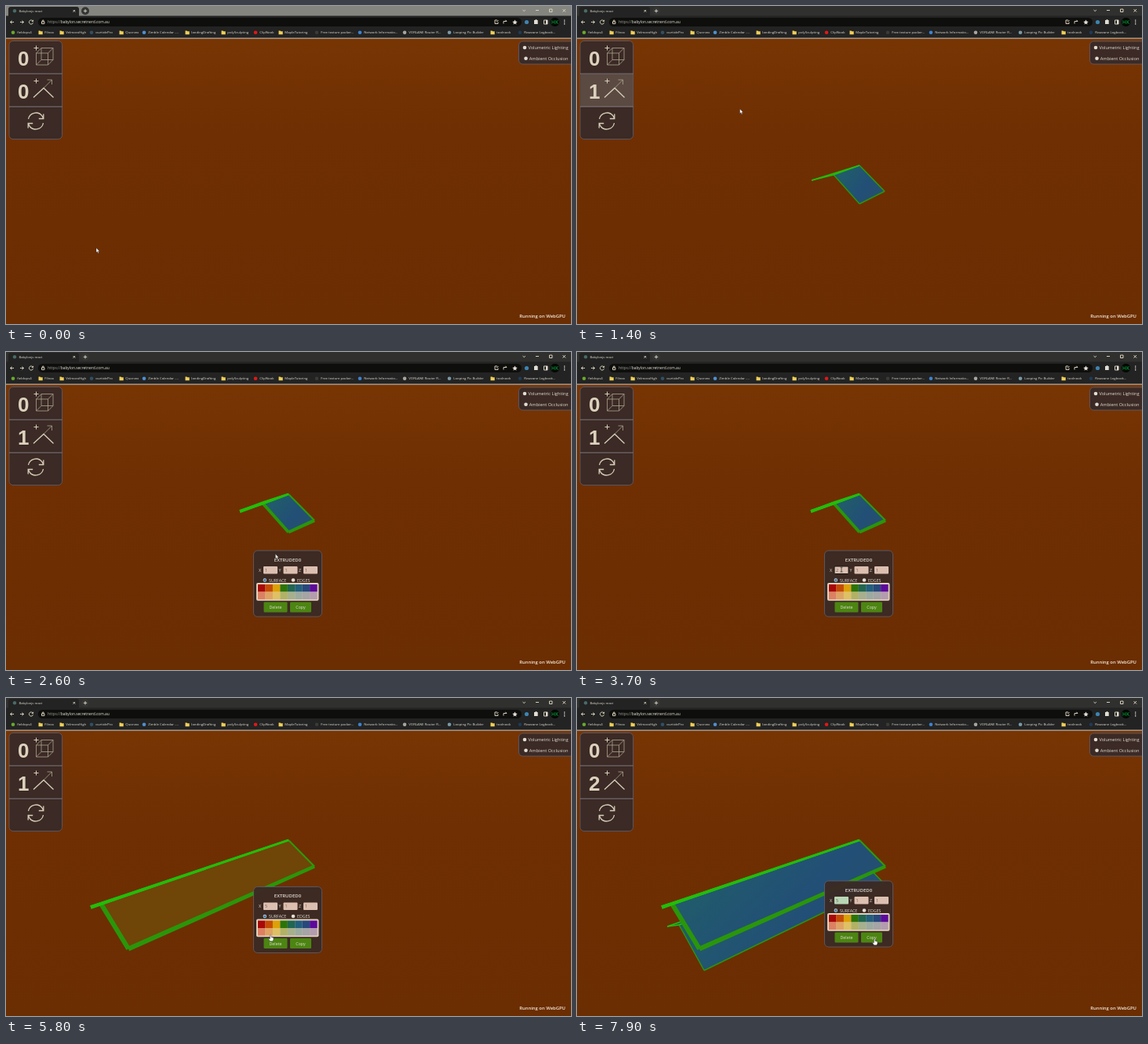
These frames come from a looping animation (720 by 405 pixels, 8000 ms). An HTML page:

```html
<!DOCTYPE html>
<html lang="en">
<head>
<meta charset="utf-8">
<title>Roof editor</title>
<style>
html, body { margin: 0; width: 100%; height: 100%; overflow: hidden; background: #6d2e02; }
svg { display: block; width: 720px; height: 405px; font-family: "Open Sans", "Noto Sans", sans-serif; }
.ui { fill: #e2ddd4; }
.line { fill: none; stroke: #d6cdb8; stroke-width: 1; }
.thin { stroke: #aca48f; stroke-width: .8; }
.box { fill: #3b2a25; stroke: #5d6070; stroke-width: .8; }
.count { font: bold 26px "Liberation Sans", Arial, sans-serif; fill: #dcd2bd; }
.small { font-size: 5.3px; fill: #e2ddd4; }
</style>
</head>
<body>
<svg viewBox="0 0 720 405">
  <defs>
    <linearGradient id="sky" x2="0" y2="1">
      <stop offset=".1" stop-color="#783504"/><stop offset=".4" stop-color="#6f2f02"/><stop offset="1" stop-color="#6b2d02"/>
    </linearGradient>
    <linearGradient id="blue" x2="1" y2=".5">
      <stop stop-color="#22606a"/><stop offset=".3" stop-color="#215a6c"/><stop offset=".7" stop-color="#224f76"/><stop offset="1" stop-color="#264f70"/>
    </linearGradient>
  </defs>
  <rect width="720" height="405" fill="url(#sky)"/>

  <!-- browser bars -->
  <rect id="tabs" width="720" height="13"/>
  <rect y="12.5" width="720" height="28.5" fill="#222322"/>
  <path d="M3 13V4q0-3 3-3H90q3 0 3 3V13z" fill="#222322"/>
  <rect x="41" y="15" width="616" height="11" rx="5.5" fill="#0e0e0c"/>
  <path d="M0 41.2H720" stroke="#b3aca4" stroke-width="1.2"/>
  <circle cx="11" cy="6.3" r="2.2" fill="#4a6a68"/>
  <text x="16.5" y="8" class="ui" font-size="4.2">Babylonjs react</text>
  <circle cx="101" cy="6.3" r="5" fill="#343534"/>
  <path class="line" d="M85.5 5l2.6 2.6m0-2.6l-2.6 2.6M98.8 6.3h4.4m-2.2-2.2v4.4M10 20.5H5.5l2-2m-2 2l2 2M18 20.5h4.5l-2-2m2 2l-2 2M34.3 19.3a2.6 2.6 0 1 0 .2 2M34.6 17.8v1.8h-1.8M45.5 20h3.4v2.6h-3.4zM46.2 20v-1a1 1 0 0 1 2 0v1M658.5 5l1.7 1.6 1.7-1.6M675 5.5h4M692.5 4h3.5v3.5h-3.5zM709.5 4l3.5 3.5m0-3.5l-3.5 3.5M626 18h-3v4.5h4v-2M625 20.5l2.5-2.5M634 22.5v-3h4l-1.5-1.7M685.5 18h4.5v5h-4.5z"/>
  <path class="ui" d="M648.5 17.5l1 2.1 2.2.3-1.7 1.5.5 2.2-2-1.1-2 1.1.5-2.2-1.7-1.5 2.2-.3zM673 18h1.500a1 1 0 0 1 2 0h1.200v5h-4.700zM688 18h2v5h-2zM711 17.500h1.300v1.300h-1.300zm0 2.300h1.300v1.300h-1.300zm0 2.300h1.300v1.300h-1.300z"/>
  <circle cx="663.5" cy="20.5" r="2.6" fill="#3d83b0"/>
  <rect x="694" y="15" width="11" height="11" rx="5" fill="#020802"/>
  <text x="699.5" y="23" font-size="6.5" text-anchor="middle" fill="#10c04b">HK</text>
  <text x="53" y="22.3" font-size="4.9" fill="#a5a5a0">https://<tspan fill="#eeeae2">babylon.secretnerd.com.au</tspan></text>
  <g id="marks" class="ui" font-size="4.3"></g>

  <!-- left tools -->
  <rect class="box" x="4" y="44.5" width="67.5" height="125" rx="5"/>
  <rect id="hover" x="4.5" y="87" width="66.5" height="41" fill="#5b4a42"/>
  <path d="M4 86.2h67.5M4 128.2h67.5" stroke="#8f8a92" stroke-width=".8"/>
  <text class="count" x="15" y="76">0</text>
  <text class="count" x="15" y="118" id="count">0</text>
  <path class="line" d="M35.5 53.5h6m-3-3v6M35.5 95.5h6m-3-3v6"/>
  <path class="line thin" d="M38.5 60h15v15h-15zM45 53.5h15v15h-15zM38.5 60l6.5-6.5M53.5 60l6.5-6.5M53.5 75l6.5-6.5M38.5 75l6.5-6.5M48 104.5l10.5-10.5m-6 0h6v6"/>
  <path class="line" style="stroke-width:1.3" d="M35 116.5l13-12 12.5 12M28.5 144a9.8 9.8 0 0 1 17.5-4l1.5 3M47.5 149a9.8 9.8 0 0 1-17.5 4l-1.5-3M47.8 137.5v6h-6M28.2 155.5v-6h6"/>

  <!-- right options -->
  <rect class="box" x="653.5" y="45" width="72" height="29" rx="5"/>
  <g class="ui">
    <circle cx="661" cy="53" r="2.3"/><circle cx="662.5" cy="66.8" r="2.3"/>
    <g text-anchor="end" font-size="5.7">
      <text x="716.5" y="55.2">Volumetric Lighting</text>
      <text x="716.5" y="68.8">Ambient Occlusion</text>
      <text x="713" y="397" font-weight="600" font-size="5.9" fill="#f4ecdc">Running on WebGPU</text>
    </g>
  </g>

  <g id="scene"></g>

  <g id="panel">
    <rect class="box" x=".5" y=".5" width="87" height="84" rx="5" fill-opacity=".96"/>
    <text x="44" y="14.3" text-anchor="middle" class="ui" font-size="6" font-weight="600">EXTRUDED0</text>
    <g id="fields"></g>
    <circle cx="14.8" cy="38" r="2.2" class="ui"/><circle cx="14.8" cy="38" r="1.5" fill="#2877b8"/>
    <circle cx="51" cy="38" r="2.3" class="ui"/>
    <text x="20" y="40.2" class="small">SURFACE</text><text x="56" y="40.2" class="small">EDGES</text>
    <rect x="4" y="41.5" width="79.5" height="22.8" rx="2" fill="#e2d0ba"/>
    <g id="swatches"></g>
    <rect x="13.5" y="66" width="30" height="13" rx="1" fill="#4c8512"/>
    <rect x="47" y="66" width="27" height="13" rx="1" fill="#4c8512"/>
    <g class="small" text-anchor="middle"><text x="28.5" y="74.5">Delete</text><text x="60.5" y="74.5">Copy</text></g>
  </g>

  <g id="cursor" stroke="#222" stroke-width=".4" fill="#fff">
    <path id="arrow" d="M0 0v6l1.4-1.2 1 2.2 1-.5-1-2.1h1.9z"/>
    <path id="beam" d="M-1.5-3h3M0-3v6M-1.5 3h3" stroke="#333" stroke-width=".8"/>
    <path id="hand" d="M-.6-3q.9-1 1.5 0v2.5l3 .7v2.5l-1 2h-3.4l-2-3q0-1 1.9 0z"/>
  </g>
</svg>
<script>
const LOOP = 8000;
const $ = id => document.getElementById(id);
const clamp = v => Math.max(0, Math.min(1, v));
const ramp = (t, a, b) => clamp((t - a) / (b - a));
const ease = u => u * u * (3 - 2 * u);
const mix = (a, b, u) => a + (b - a) * u;
const mixPts = (p, q, u) => p.map((v, i) => [mix(v[0], q[i][0], u), mix(v[1], q[i][1], u)]);

// bookmarks: icon x, label, icon colour (folder when omitted)
const bookmarks = [
  [9, 'fieldops4', '#6aa82c'], [44, 'Filnox'], [71, 'VelmoraHigh'], [109, 'ourtidePro', '#334f63'],
  [147, 'Quorvex'], [176, 'Zimble Calendar -...', '#4f8fd0'], [231, 'landingDrafting'], [277, 'polySculpting'],
  [318, 'ClipNook', '#e01818'], [350, 'MapleTutoring'], [396, 'Free texture packer...', '#3c3a34'],
  [451, 'Network Informatio...', '#3d83d0'], [508, 'VORLANE Router R...', '#aaa59c'],
  [565, 'Looping Pic Builder', '#7a9aa8'], [620, 'toolnook'], [655, 'Rowvane Logbook...', '#1f3a58']
];
$('marks').innerHTML = bookmarks.map(([x, label, color]) =>
  (color ? `<circle cx="${x}" cy="33.8" r="2.3" fill="${color}"/>`
         : `<path d="M${x - 2.5} 31.5h2l.7.8h2.5v4h-5.2z" fill="#f0cf58"/>`) +
  `<text x="${x + 5.3}" y="35.4">${label}</text>`).join('');

const swatches = ['#a80808', '#c44b04', '#dda008', '#2d7408', '#216650', '#235f7c', '#27487c', '#5b0a9a',
                  '#dd8062', '#dfa262', '#dfc064', '#b1b264', '#a6b08c', '#9caaa0', '#a5a4a6', '#b39cae'];
$('swatches').innerHTML = swatches.map((c, i) =>
  `<rect x="${6 + i % 8 * 9.45}" y="${i < 8 ? 43.5 : 53}" width="9.5" height="9.5" fill="${c}"/>`).join('');

$('fields').innerHTML = ['X', 'Y', 'Z'].map((name, i) => {
  const x = 7 + i * 25.5;
  return `<text class="small" x="${x}" y="27.3">${name}</text>
    <rect id="in${name}" x="${x + 6}" y="20.5" width="18" height="9.5" rx="1" fill="#dcbfb0"/>
    <text id="val${name}" x="${x + 8}" y="27.3" font-size="5.3" fill="#6d5a50">1</text>`;
}).join('');

// roof corners: eave tip, front ridge, front foot, back foot, back ridge
const flat = [[299, 222], [327, 215], [360, 252], [392, 236], [360, 203]];
const short = [[298, 203], [327, 192.5], [360, 229.5], [393, 214.5], [360, 181]];
const long = [[108, 266.5], [121, 262], [156, 319.5], [393, 214.5], [360, 181]];
const copy = [[115, 291], [130, 289], [162, 347], [391, 236], [360, 204]];

const poly = (pts, fill) => `<polygon points="${pts}" fill="${fill}"/>`;

function bar(a, b, wa, wb, fill) {
  const dx = b[0] - a[0], dy = b[1] - a[1], d = 2 * Math.hypot(dx, dy);
  const nx = -dy / d, ny = dx / d;
  return poly([[a[0] + nx * wa, a[1] + ny * wa], [b[0] + nx * wb, b[1] + ny * wb],
               [b[0] - nx * wb, b[1] - ny * wb], [a[0] - nx * wa, a[1] - ny * wa]], fill);
}

function roof([tip, ridge, foot, back, top], thick, size, fill) {
  const w = v => mix(1.5, v, thick), near = w(4 + size * 2);
  return poly([tip, ridge, top], '#24605a') + poly([ridge, foot, back, top], fill) +
    bar(top, back, w(2), w(2), '#2c9c0a') +
    bar(foot, back, near, w(4.5), '#2a960a') +
    bar(ridge, foot, near, near, '#2a960a') +
    bar(tip, top, w(4), w(2.5), '#22bd0a') +
    bar(ridge, top, w(4), w(2.5), '#22bd0a') +
    bar(tip, ridge, near - thick, w(4), '#22bd0a');
}

const mouse = [[0, 115, 308], [300, 108, 290], [900, 48, 110], [1200, 48, 110], [1400, 207.5, 131], [2000, 355, 221],
  [2300, 355, 221], [2800, 337, 277], [4600, 337, 277], [5000, 337, 294], [5400, 337, 294],
  [5700, 337, 305], [6200, 337, 305], [7000, 379, 310], [8000, 379, 310]];

function mouseAt(t) {
  const i = mouse.findIndex(k => k[0] > t), a = mouse[i - 1], b = mouse[i];
  const u = ease(ramp(t, a[0], b[0]));
  return [mix(a[1], b[1], u), mix(a[2], b[2], u)];
}

function panelAt(t) {
  const [start, length, y] = t < 5500 ? [2000, 400, 252.5] : t < 6400 ? [5500, 300, 240] : [6400, 400, 232.5];
  const left = 1 - ease(ramp(t, start, start + length));
  return [315 - 200 * left, y + 105 * left];
}

const show = (id, on) => { $(id).style.display = on ? '' : 'none'; };
const move = (id, p) => $(id).setAttribute('transform', `translate(${p})`);

function draw(now) {
  const t = Math.floor(now % LOOP / 100) * 100;

  // each click on the spinner lengthens the roof by one unit
  let scale = 1;
  for (let k = 0; k < 4; k++) scale += ease(ramp(t, 3700 + 200 * k, 3900 + 200 * k));
  const reach = s => 30.6 * s / (1 - .0725 * s);
  const size = (reach(scale) - reach(1)) / (reach(5) - reach(1));
  const rise = ease(ramp(t, 1400, 1900));
  const pts = mixPts(mixPts(flat, short, rise), long, size);
  const fill = t >= 5500 && t < 6400 ? '#704508' : 'url(#blue)';
  $('scene').innerHTML = (t >= 7500 ? roof(copy, 0, 1, 'url(#blue)') : '') +
    (t >= 1200 ? roof(pts, rise, size, fill) : '');

  // the window gains focus with the first click
  $('tabs').setAttribute('fill', t < 1100 ? '#858580' : '#30312f');
  $('count').textContent = t < 1200 ? 0 : t < 7500 ? 1 : 2;
  $('hover').style.opacity = t < 900 ? 0 : 1 - ramp(t, 1400, 2000);

  show('panel', t >= 2000);
  move('panel', panelAt(t));
  $('valX').textContent = t < 3600 ? 1 : Math.min(5, 2 + Math.floor((t - 3600) / 200));
  $('inX').setAttribute('stroke', t >= 3000 && t < 5500 ? '#181410' : 'none');
  $('inX').setAttribute('fill', t >= 6800 ? '#b8d6b4' : '#dcbfb0');

  const beam = t >= 2800 && t < 4700, hand = t >= 5500;
  show('beam', beam);
  show('hand', hand);
  show('arrow', !beam && !hand);
  move('cursor', mouseAt(t));
}

function frame(now) {
  draw(now);
  requestAnimationFrame(frame);
}
frame(0);
</script>
</body>
</html>
```
